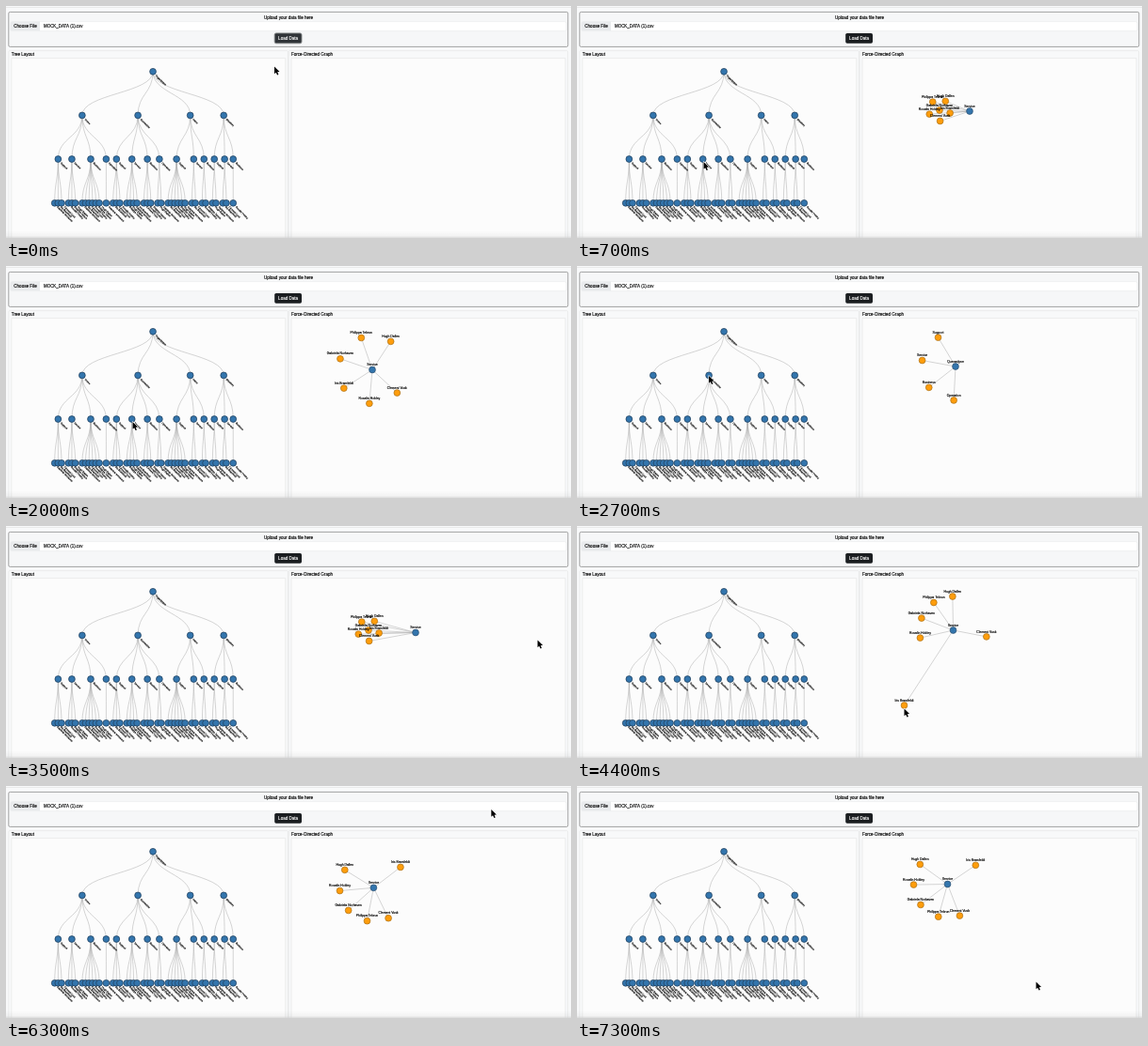
An HTML page with a canvas that plays this animation: 600 by 247 pixels, repeating every 7400 ms.

```html
<!DOCTYPE html>
<html lang="en">
<head>
<meta charset="utf-8">
<title>Tree and force graph</title>
<style>
html, body { margin: 0; width: 100%; height: 100%; overflow: hidden; background: #f8f9fa; }
canvas { display: block; width: 600px; height: 247px; }
</style>
</head>
<body>
<canvas id="stage"></canvas>
<script>
const W = 600, H = 247, LOOP = 7400, STEP = 100;
const LINK = 36, RAD = Math.PI / 180;
const FONT = '"Liberation Sans", Arial, sans-serif';
const BLUE = '#3375ad', ORANGE = '#ff9d0c';
const canvas = document.getElementById('stage');
const ctx = canvas.getContext('2d');
const dpr = window.devicePixelRatio || 1;
canvas.width = W * dpr;
canvas.height = H * dpr;

const people = ['Gabriela Norhaven', 'Iris Bramfeldt', 'Clement Vusk',
  'Rosalin Hobley', 'Philippa Tebrun', 'Hugh Dallen'];
const units = ['Support', 'Service', 'Business', 'Operation'];
const firms = ['Tolvex', 'Quenadyne', 'Halvo', 'Drixamel'];

const lerp = (a, b, u) => a + (b - a) * u;
const clamp = u => Math.min(1, Math.max(0, u));
const smooth = u => u * u * (3 - 2 * u);
const settle = u => 1 - (1 - u) ** 2;

// Neighbours are kept as angle and distance from the hub.
// A fan gives each neighbour the slot of its digit in `order`; dots are gaps.
function fan(t, hub, start, step, order) {
  const spokes = [...order].map((_, k) => ({
    angle: (start + step * order.indexOf(k)) * RAD, r: LINK
  }));
  return { t, hub, spokes };
}

// A tight bunch beside the hub: one in the middle, the others around it.
function bunch(t, hub, mid, count) {
  const spokes = Array.from({ length: count }, (_, k) => {
    const turn = (15 + 360 / (count - 1) * (k - 1)) * RAD;
    const dx = mid[0] - hub[0] + (k ? 11.5 * Math.cos(turn) : 0);
    const dy = mid[1] - hub[1] + (k ? 11.5 * Math.sin(turn) : 0);
    return { angle: Math.atan2(dy, dx), r: Math.hypot(dx, dy) };
  });
  return { t, hub, spokes };
}

const graphs = [
  { hub: 'Service', labels: people, poses: [
    bunch(700, [417, 112], [385, 111], 6),
    fan(1400, [389, 110.5], 43, 52, '231045')
  ] },
  { hub: firms[1], labels: units, poses: [
    bunch(2300, [423, 112], [385, 110], 4),
    fan(2700, [402, 107], 93, 48.7, '3210'),
    fan(3100, [393, 108], 85, 56, '3210')
  ] },
  { hub: 'Service', labels: people, poses: [
    bunch(3200, [437, 114], [385, 111], 6),
    bunch(3500, [435, 113.5], [385, 111], 6),
    fan(4400, [399.5, 111], 167, 34, '3045..2'),
    fan(5500, [385, 115.5], 6, 30, '2..1.0.3.45'),
    fan(6100, [389, 110], 62, 37, '24035..1'),
    fan(7300, [393.5, 104.5], 69, 36.7, '24035..1')
  ] }
];
const drags = [
  { who: 1, from: 4200, to: 4800 },
  { who: 4, from: 5400, to: 6000 }
];
// Pointer stops: arrival, departure, x, y.
const stops = [
  [0, 100, 285, 64], [600, 2000, 134.5, 165.5], [2300, 2700, 140, 116.5],
  [3000, 3200, 134.5, 165.5], [3500, 4000, 564.5, 121], [4200, 4200, 385, 147],
  [4400, 4400, 347.5, 194], [4800, 4900, 386, 153], [5400, 5500, 385, 82],
  [6000, 6000, 382, 146], [6400, 6500, 540, 2], [7000, LOOP, 487.5, 208]
];

function pointerAt(t) {
  const i = stops.findIndex(s => s[1] >= t);
  const [arrive, , x, y] = stops[i];
  if (t >= arrive) return [x, y];
  const [, leave, px, py] = stops[i - 1];
  const e = smooth((t - leave) / (arrive - leave));
  return [lerp(px, x, e), lerp(py, y, e)];
}

function poseAt(poses, t) {
  const i = poses.findIndex(p => p.t > t);
  if (i < 0) return poses[poses.length - 1];
  const a = poses[i - 1], b = poses[i];
  const e = settle((t - a.t) / (b.t - a.t));
  return {
    hub: a.hub.map((v, n) => lerp(v, b.hub[n], e)),
    spokes: a.spokes.slice(0, b.spokes.length).map((s, k) => {
      const turn = b.spokes[k].angle - s.angle;
      const shortest = Math.atan2(Math.sin(turn), Math.cos(turn));
      return { angle: s.angle + shortest * e, r: lerp(s.r, b.spokes[k].r, e) };
    })
  };
}

function graphPoints(g, t) {
  const { hub: [hx, hy], spokes } = poseAt(g.poses, t);
  const pts = [{ label: g.hub, x: hx, y: hy }];
  g.labels.forEach((label, k) => {
    const { angle, r } = spokes[k];
    pts.push({ label, x: hx + r * Math.cos(angle), y: hy + r * Math.sin(angle) });
  });
  const [px, py] = pointerAt(t);
  for (const d of drags) {
    const pull = clamp(Math.min(t - d.from + 100, d.to + 100 - t) / 100);
    if (!pull) continue;
    const p = pts[d.who + 1];
    p.x = lerp(p.x, px, pull);
    p.y = lerp(p.y, py - 3, pull);
  }
  return pts;
}

// Parents sit midway between their first and last child.
function buildTree() {
  const leafCounts = [[3, 3, 6, 1], [3, 4, 3, 2], [6, 2, 2], [2, 2, 1]];
  const gap = 3.645;
  let x = 51.7 - 2 * gap, leafNo = 0;
  const parent = (kids, y, label) =>
    ({ x: (kids[0].x + kids[kids.length - 1].x) / 2, y, label, kids });
  const leaf = (_, i) => {
    x += i ? gap : 2 * gap;
    return { x, y: 209.8, label: people[leafNo++ % people.length], kids: [] };
  };
  const tops = leafCounts.map((counts, f) => {
    const mids = counts.map((length, n) =>
      parent(Array.from({ length }, leaf), 163, units[n]));
    return parent(mids, 116.4, firms[f]);
  });
  return parent(tops, 69.8, 'Organization');
}
const nodes = [];
(function collect(n) { nodes.push(n); n.kids.forEach(collect); })(buildTree());

function box(x, y, w, h, fill, stroke, r = 0, lw = 0.5) {
  ctx.beginPath();
  ctx.roundRect(x, y, w, h, r);
  if (fill) { ctx.fillStyle = fill; ctx.fill(); }
  if (stroke) { ctx.strokeStyle = stroke; ctx.lineWidth = lw; ctx.stroke(); }
}

// The hairline outline gives small type enough weight.
function text(str, x, y, size, align = 'left', color = '#000') {
  ctx.font = `${size}px ${FONT}`;
  ctx.textAlign = align;
  ctx.fillStyle = ctx.strokeStyle = color;
  ctx.lineWidth = 0.14;
  ctx.fillText(str, x, y);
  ctx.strokeText(str, x, y);
}

function dot(x, y, fill, stroke) {
  ctx.beginPath();
  ctx.arc(x, y, 3.4, 0, Math.PI * 2);
  ctx.fillStyle = fill;
  ctx.fill();
  ctx.strokeStyle = stroke;
  ctx.lineWidth = 0.7;
  ctx.stroke();
}

function drawPage(focused) {
  box(0, 0, W, H, '#f8f9fa');
  box(0, 1, W, 0.6, '#dcdcdc');
  box(2.8, 6.4, 594, 37, '#f6f7f8', '#8c8c8c', 1.5, 0.8);
  text('Upload your data file here', 300, 13.5, 4.55, 'center');
  box(5, 16.6, 590, 10, '#fff', '#e4e6e8', 1.5);
  box(5, 16.6, 31, 10, '#e9ebed', null, [1.5, 0, 0, 1.5]);
  text('Choose File', 8.2, 23.2, 4.6);
  text('MOCK_DATA (1).csv', 40, 23.2, 4.45);
  box(285.2, 28.9, 28.8, 10.9, focused ? '#303438' : '#1b1e21', focused && '#85888a', 1.7, 0.9);
  text('Load Data', 299.6, 36, 4.55, 'center', '#fff');
  const panels = [[2.8, 'Tree Layout'], [300, 'Force-Directed Graph']];
  for (const [x, title] of panels) {
    box(x, 47.6, 296.6, 210, null, '#dedede', 1);
    text(title, x + 3, 53.3, 4.55);
    box(x + 3, 55.6, 291, 200, '#fcfcfc', '#dfdfdf');
  }
}

function drawBottomEdge() {
  const shade = ctx.createLinearGradient(0, 239, 0, H);
  shade.addColorStop(0, 'rgba(0,0,0,0)');
  shade.addColorStop(1, 'rgba(0,0,0,0.05)');
  box(0, 239, W, 8, shade);
  box(0, 245.8, W, 0.7, '#d2d2d2');
}

function drawTree() {
  ctx.strokeStyle = '#aaa';
  ctx.lineWidth = 0.5;
  ctx.beginPath();
  for (const n of nodes) for (const k of n.kids) {
    const my = (n.y + k.y) / 2;
    ctx.moveTo(n.x, n.y);
    ctx.bezierCurveTo(n.x, my, k.x, my, k.x, k.y);
  }
  ctx.stroke();
  for (const n of nodes) dot(n.x, n.y, BLUE, '#1f3c57');
  for (const n of nodes) {
    ctx.save();
    ctx.translate(n.x, n.y);
    ctx.rotate(Math.PI / 4);
    text(n.label, 4.9, 1.5, 2.65);
    ctx.restore();
  }
}

function drawGraph(t) {
  const g = graphs.findLast(v => t >= v.poses[0].t);
  if (!g) return;
  const pts = graphPoints(g, t);
  ctx.strokeStyle = '#aaa';
  ctx.lineWidth = 0.5;
  ctx.beginPath();
  for (const q of pts.slice(1)) {
    ctx.moveTo(pts[0].x, pts[0].y);
    ctx.lineTo(q.x, q.y);
  }
  ctx.stroke();
  pts.forEach((q, i) => dot(q.x, q.y, i ? ORANGE : BLUE, i ? '#a8701a' : '#2f5170'));
  for (const q of pts) text(q.label, q.x, q.y - 4.3, 3.4, 'center');
}

function drawArrow(x, y) {
  ctx.save();
  ctx.translate(x, y + 0.4);
  ctx.scale(0.87, 0.87);
  ctx.beginPath();
  [[0, 0], [0, 9], [2, 7.2], [3.5, 10.6], [5.1, 9.9], [3.7, 6.6], [6.4, 6.5]]
    .forEach(([px, py]) => ctx.lineTo(px, py));
  ctx.closePath();
  ctx.lineJoin = 'round';
  ctx.lineWidth = 1.2;
  ctx.strokeStyle = '#fff';
  ctx.stroke();
  ctx.fillStyle = '#000';
  ctx.fill();
  ctx.restore();
}

function drawMove(x, y) {
  ctx.save();
  ctx.translate(x, y);
  ctx.beginPath();
  for (let i = 0; i < 4; i++) {
    ctx.moveTo(0, 0);
    ctx.lineTo(0, -3.8);
    ctx.moveTo(-1.2, -2.7);
    ctx.lineTo(0, -3.9);
    ctx.lineTo(1.2, -2.7);
    ctx.rotate(Math.PI / 2);
  }
  for (const [color, width] of [['#fff', 2], ['#000', 1.1]]) {
    ctx.strokeStyle = color;
    ctx.lineWidth = width;
    ctx.stroke();
  }
  ctx.restore();
}

function render(t) {
  ctx.setTransform(dpr, 0, 0, dpr, 0, 0);
  drawPage(t < graphs[0].poses[0].t);
  drawTree();
  drawGraph(t);
  drawBottomEdge();
  const [x, y] = pointerAt(t);
  if (t >= 5400 && t < 6000) drawMove(x, y);
  else drawArrow(x, y);
}

const begin = performance.now();
function tick() {
  const t = (performance.now() - begin) % LOOP;
  render(Math.floor(t / STEP) * STEP);
  requestAnimationFrame(tick);
}
tick();
</script>
</body>
</html>
```
